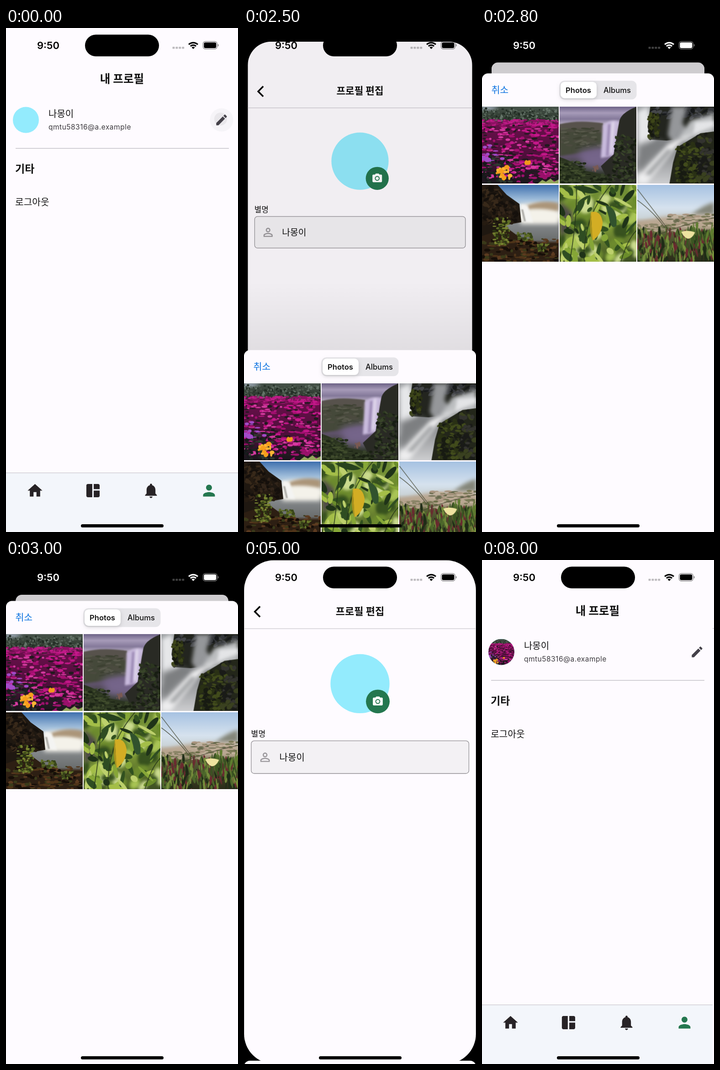
Animation, 508 px wide and 1102 px high, one loop 8.1 s. Source, as an HTML page with a canvas:

```html
<!DOCTYPE html>
<html lang="ko">
<head>
<meta charset="utf-8">
<title>프로필 편집</title>
<style>
html, body { margin: 0; width: 100%; height: 100%; overflow: hidden; background: #fefbff; }
canvas { display: block; width: 508px; height: 1102px; }
</style>
</head>
<body>
<canvas id="stage" width="508" height="1102"></canvas>
<script>
const W = 508, H = 1102, LOOP = 8100, CELL = 168;
const PAPER = '#fefbff', INK = '#111', GREEN = '#24774f', AQUA = '#93ebfd';
const NAME = '나몽이', MAIL = 'qmtu58316@a.example';
const ctx = document.getElementById('stage').getContext('2d');

// 24-unit icon outlines
const ICONS = {
  pencil: 'M3 17.25V21h3.75L17.81 9.94l-3.75-3.75zM20.71 7.04c.39-.39.39-1.02 0-1.41l-2.34-2.34c-.39-.39-1.02-.39-1.41 0l-1.83 1.83 3.75 3.75z',
  home: 'M10 20v-6h4v6h5v-8h3L12 3 2 12h3v8z',
  board: 'M11 21H5c-1.1 0-2-.9-2-2V5c0-1.1.9-2 2-2h6zM13 21h6c1.1 0 2-.9 2-2v-7h-8zM21 10V5c0-1.1-.9-2-2-2h-6v7z',
  bell: 'M12 22c1.1 0 2-.9 2-2h-4c0 1.1.9 2 2 2zM18 16v-5c0-3.07-1.64-5.64-4.5-6.32V4c0-.83-.67-1.5-1.5-1.5s-1.5.67-1.5 1.5v.68C7.63 5.36 6 7.92 6 11v5l-2 2v1h16v-1z',
  person: 'M12 12c2.21 0 4-1.79 4-4s-1.79-4-4-4-4 1.79-4 4 1.79 4 4 4zM12 14c-2.67 0-8 1.34-8 4v2h16v-2c0-2.66-5.33-4-8-4z',
  personLine: 'M12 5.9a2.1 2.1 0 1 1 0 4.2 2.1 2.1 0 0 1 0-4.2M12 14.9c2.97 0 6.1 1.46 6.1 2.1v1.1H5.9V17c0-.64 3.13-2.1 6.1-2.1M12 4C9.79 4 8 5.79 8 8s1.79 4 4 4 4-1.79 4-4-1.79-4-4-4zM12 13c-2.67 0-8 1.34-8 4v3h16v-3c0-2.66-5.33-4-8-4z',
  camera: 'M9 2 7.17 4H4c-1.1 0-2 .9-2 2v12c0 1.1.9 2 2 2h16c1.1 0 2-.9 2-2V6c0-1.1-.9-2-2-2h-3.17L15 2zM12 17a5 5 0 1 1 0-10 5 5 0 0 1 0 10zM12 15.2a3.2 3.2 0 1 0 0-6.4 3.2 3.2 0 0 0 0 6.4z'
};
for (const key in ICONS) ICONS[key] = new Path2D(ICONS[key]);

function icon(name, cx, cy, size, color) {
  ctx.save();
  ctx.translate(cx - size / 2, cy - size / 2);
  ctx.scale(size / 24, size / 24);
  ctx.fillStyle = color;
  ctx.fill(ICONS[name], 'evenodd');
  ctx.restore();
}

function rect(x, y, w, h, color, r = 0) {
  ctx.beginPath();
  ctx.roundRect(x, y, w, h, r);
  ctx.fillStyle = color;
  ctx.fill();
}

function disc(x, y, r, color) {
  ctx.beginPath();
  ctx.arc(x, y, r, 0, 7);
  ctx.fillStyle = color;
  ctx.fill();
}

function line(points, color, width) {
  ctx.beginPath();
  points.forEach(p => ctx.lineTo(...p));
  ctx.strokeStyle = color;
  ctx.lineWidth = width;
  ctx.stroke();
}

// cy is the optical middle of the line
function text(s, x, cy, size, { weight = 400, color = INK, align = 'left', gap = 0 } = {}) {
  ctx.font = `${weight} ${size}px Inter, "Noto Sans CJK KR", "Noto Sans CJK", sans-serif`;
  ctx.textAlign = align;
  ctx.letterSpacing = gap + 'px';
  ctx.fillStyle = color;
  ctx.fillText(s, x, cy + size * .365);
}

// Pictures: soft gradients, flat shapes and seeded specks
let seed = 7;
const rand = () => (seed = seed * 16807 % 2147483647) / 2147483647;

function picture(stops, paint) {
  const c = document.createElement('canvas');
  c.width = c.height = CELL;
  const g = c.getContext('2d'), fade = g.createLinearGradient(0, 0, 0, CELL);
  stops.forEach(([at, color]) => fade.addColorStop(at, color));
  g.fillStyle = fade;
  g.fillRect(0, 0, CELL, CELL);
  const poly = (color, d, blur = 0) => {
    g.filter = blur ? `blur(${blur}px)` : 'none';
    g.fillStyle = color;
    g.fill(new Path2D(d));
    g.filter = 'none';
  };
  const specks = (n, x, y, w, h, rx, ry, colors, tilt = 0) => {
    for (let i = 0; i < n; i++) {
      g.beginPath();
      g.ellipse(x + rand() * w, y + rand() * h, rx * (.5 + rand()), ry * (.5 + rand()), tilt * (rand() - .5), 0, 7);
      g.fillStyle = colors[i % colors.length];
      g.fill();
    }
  };
  paint(poly, specks, g);
  return c;
}

const photos = [
  picture([[0, '#47534a'], [.16, '#2c382d'], [.22, '#6a0f4b'], [.7, '#4a0f38'], [1, '#17171a']], (poly, specks) => {
    poly('#b4bfd0', 'M0 0H38Q20 8 0 8z', 3);
    specks(260, 0, 4, 168, 30, 2.2, 1.8, ['#66756a', '#222d24', '#4a584b']);
    specks(160, 0, 28, 168, 14, 4, 1.6, ['#c01c88', '#8e1263']);
    specks(330, 0, 40, 168, 116, 5, 2.2, ['#c4188a', '#1f1a1d', '#a40f70', '#d63aa0']);
    specks(90, 0, 108, 64, 60, 4, 2.5, ['#1c2420', '#2f3a30', '#15181a']);
    specks(50, 76, 140, 92, 28, 5, 2.5, ['#1f1b20', '#9b116c']);
    specks(22, 0, 84, 45, 34, 4, 2.2, ['#a34bc8']);
    specks(18, 32, 132, 32, 24, 4, 4, ['#f79f1c', '#ffb535']);
    specks(4, 97, 120, 8, 6, 4, 4, ['#f2991c']);
    poly('#94a75c', 'M122 168l10-8 8 4 10-7 8 7 10-5v9z');
  }),
  picture([[0, '#6f6488'], [.08, '#a79bb9'], [.16, '#84799a'], [.22, '#b1a7bd'], [.3, '#55504b'], [.65, '#5f526a'], [.8, '#3a4134'], [1, '#1d2417']], (poly, specks) => {
    poly('#57524c', 'M0 38Q40 28 95 36V90H0z', 1);
    poly('#45493a', 'M0 52Q50 44 95 58V92L0 108z', 2);
    specks(50, 0, 44, 90, 46, 8, 2, ['#3d4132', '#57584a', '#4b4b3f'], .6);
    poly('#75658a', 'M40 100Q85 82 122 92L112 136 54 134z', 8);
    poly('#c9bbdd', 'M94 40Q112 26 130 32L122 106 90 112z', 2);
    poly('#9886b1', 'M106 38l5 0-4 70-6 0z', 2);
    poly('#dfd6ea', 'M114 34l6-1-5 68-5 0z', 2);
    poly('#292a24', 'M168 0Q132 14 130 34L118 104 90 130 110 168H168z');
    poly('#2b3420', 'M0 110Q35 122 56 140L104 150 116 168H0z');
    specks(120, 0, 118, 56, 50, 4, 2, ['#414d2d', '#1d2616', '#323d24']);
    specks(110, 118, 62, 50, 90, 4, 2.5, ['#39452a', '#181e13', '#2c3620'], 2);
    specks(60, 60, 148, 108, 20, 4, 2, ['#1a2113', '#38432a']);
    specks(8, 72, 130, 12, 14, 1.5, 4, ['#7a5a52']);
  }),
  picture([[0, '#9fa2a5'], [.5, '#808285'], [1, '#cdced0']], (poly, specks) => {
    poly('#e6e7e9', 'M0 10L22 0 40 70 0 120z', 5);
    poly('#23251f', 'M28 0H168V38L130 66 64 74 30 72 22 44z');
    specks(60, 30, 0, 138, 24, 7, 4, ['#34363a', '#17191a', '#45474a'], 2);
    poly('#95979a', 'M76 0H108L98 36 116 58 84 88 66 62z', 4);
    poly('#bdbfc1', 'M116 30L168 14V56L104 76 92 66z', 4);
    poly('#e4e5e7', 'M126 34L168 30V42L122 60z', 3);
    specks(50, 26, 16, 20, 52, 4, 4, ['#3d4519', '#2a3014', '#15170f'], 2);
    poly('#eeeeef', 'M168 36Q110 60 84 88L20 168H0V150L66 82z', 5);
    poly('#a3a5a7', 'M66 92L16 148 28 150 78 96z', 4);
    poly('#7d7f81', 'M0 84L30 74 60 78 8 140H0z', 7);
    poly('#23261a', 'M168 54L138 58 88 88 78 122 70 168H168z');
    specks(150, 86, 82, 56, 82, 5, 3.5, ['#414b1c', '#2a3115', '#181b12'], 2);
    specks(70, 132, 60, 36, 104, 6, 4, ['#33332f', '#1a1b18', '#3a4120'], 2);
  }),
  picture([[0, '#3f70ae'], [.2, '#a3c0dc'], [.42, '#e4e2da'], [.5, '#85898c'], [.72, '#6b6e6e'], [.76, '#3b291a'], [1, '#20150d']], (poly, specks) => {
    poly('#f4f2ea', 'M82 44Q130 34 168 54V86H84z', 5);
    poly('#ab9579', 'M98 46Q130 32 168 40V58Q130 50 98 54z', 3);
    poly('#1f1811', 'M0 0H34L54 22 82 42 86 82 52 88 40 120 0 128z');
    poly('#2d1f13', 'M0 112L54 94 84 116 120 128 168 128V168H0z');
    poly('#f4f4f2', 'M84 42L100 46 112 82 90 80z', 2);
    poly('#a9a8a3', 'M86 54l4 0 6 26-4 0z', 1);
    specks(110, 0, 4, 44, 84, 5, 3, ['#15100c', '#38291a', '#261c12'], 2);
    specks(50, 36, 38, 42, 44, 5, 3, ['#15100c', '#32251a', '#261c12'], 2);
    specks(150, 0, 118, 168, 50, 5, 2.5, ['#4f3419', '#160e08', '#3a3a1a', '#5c3b20']);
    specks(90, 26, 72, 34, 60, 3, 2.2, ['#5e6d26', '#2c3612', '#788431']);
    specks(40, 78, 104, 32, 18, 3, 2, ['#5e6d26', '#39461a']);
    specks(24, 118, 130, 26, 18, 3, 2, ['#66742b', '#39461a']);
  }),
  picture([[0, '#6d8a35'], [.5, '#83a038'], [1, '#3e4f24']], (poly, specks, g) => {
    g.filter = 'blur(3px)';
    specks(60, 0, 0, 168, 168, 14, 12, ['#a9c455', '#6d8b2e', '#cbdb8e', '#38521f'], 3);
    poly('#4f4b48', 'M0 36L28 60 24 98 0 112z', 5);
    specks(60, 0, 0, 168, 168, 5, 13, ['#31501f', '#6b8c2b', '#a4be48', '#1f3318'], 3);
    specks(26, 0, 0, 168, 168, 5, 16, ['#2f4d22', '#86a637', '#bdd06c'], 2.4);
    g.lineWidth = 1.5;
    g.strokeStyle = '#24331a';
    g.stroke(new Path2D('M36 0Q40 60 22 168M112 0Q70 50 60 100T54 168M134 168Q148 120 168 100'));
    poly('#31522d', 'M100 44Q128 50 124 90 112 100 108 72z');
    poly('#27421e', 'M28 4Q60 -2 86 16 60 26 28 4z');
    poly('#d3ad24', 'M68 60Q90 54 94 82 92 110 72 122z');
    poly('#a8911d', 'M68 60L72 122Q62 98 68 60z');
  }),
  picture([[0, '#a6c2e2'], [.3, '#d6e2ee'], [.43, '#cbd4d8'], [.5, '#b3a18c'], [.62, '#5b6138'], [1, '#292a18']], (poly, specks, g) => {
    poly('#84867a', 'M168 38Q140 46 118 66H168z', 4);
    poly('#b9a792', 'M0 84Q60 62 168 66V98H0z', 4);
    specks(70, 70, 64, 98, 28, 6, 2, ['#7c7b59', '#a8947f', '#66694c', '#c2b19c']);
    specks(60, 0, 86, 90, 16, 5, 2, ['#8b8568', '#b5a28d', '#6a6e48']);
    specks(270, 0, 100, 168, 68, 2, 9, ['#4d682b', '#768d3c', '#6a2a30', '#1f2c17'], .7);
    specks(40, 108, 88, 60, 50, 2, 10, ['#5f7d30', '#3a5222'], .5);
    g.lineWidth = 1.2;
    g.strokeStyle = '#40432f';
    g.stroke(new Path2D('M0 10Q34 54 72 104M0 34Q36 60 60 94M0 132Q60 96 168 72'));
    poly('#eee3a0', 'M96 103Q110 98 126 104 120 118 110 118 100 114 96 103z');
  })
];

function avatar(x, y, r, chosen) {
  disc(x, y, r, AQUA);
  if (!chosen) return;
  ctx.save();
  ctx.clip();
  ctx.drawImage(photos[0], x - r, y - r, r * 2, r * 2);
  ctx.restore();
}

function profilePage(chosen, press) {
  rect(0, 0, W, H, PAPER);
  text('내 프로필', 254, 111, 24.6, { weight: 700, align: 'center' });
  avatar(43.5, 201, 28.5, chosen);
  text(NAME, 93, 188, 20);
  text(MAIL, 93, 216, 15.5, { color: '#3c393e', gap: .5 });
  if (press) {
    disc(472, 201, 25.5, '#f6f4f8');
    disc(470, 199, 13 + press * 11, '#e9e7eb');
  }
  icon('pencil', 472, 201, 31, '#444149');
  rect(21, 262.5, 467, 1.4, '#c6c3c9');
  text('기타', 20, 308, 23, { weight: 700 });
  text('로그아웃', 20, 381, 20.3);
  rect(0, 972, W, 130, '#f3f6fb');
  rect(0, 972, W, 1.3, '#cbc9cf');
  ['home', 'board', 'bell', 'person'].forEach((name, i) =>
    icon(name, 63.5 + 127 * i, 1011.5, 38.8, i < 3 ? '#272326' : GREEN));
}

function editPage(chosen) {
  rect(0, 0, W, H, PAPER);
  line([[35, 101], [23.6, 112.5], [35, 124]], '#000', 3.6);
  text('프로필 편집', 254, 111, 22, { weight: 700, align: 'center' });
  rect(0, 149, W, 1.3, '#cbc8ce');
  avatar(254, 270, 64.7, chosen);
  disc(293, 309, 26, GREEN);
  icon('camera', 293, 309, 26, '#fff');
  text('별명', 15, 379, 17.5);
  rect(15.6, 395, 477, 71.5, '#f3f1f4', 6.5);
  ctx.strokeStyle = '#939095';
  ctx.lineWidth = 1.3;
  ctx.stroke();
  icon('personLine', 46, 431, 31, '#9a979b');
  text(NAME, 77.5, 431, 20);
}

function sheet(top, picked) {
  ctx.save();
  ctx.translate(0, top);
  rect(0, 0, W, H, PAPER, 13);
  text('취소', 20.5, 36, 20.5, { color: '#0b72e0' });
  rect(169.5, 16, 169, 41, '#e6e5e9', 11);
  ctx.shadowColor = 'rgba(0,0,0,.16)';
  ctx.shadowBlur = 8;
  ctx.shadowOffsetY = 3;
  rect(172, 18.5, 79, 36, '#fff', 9);
  ctx.shadowColor = 'transparent';
  text('Photos', 211, 36.5, 16.6, { weight: 600, align: 'center' });
  text('Albums', 296, 36.5, 16.6, { weight: 500, align: 'center' });
  photos.forEach((p, i) => ctx.drawImage(p, i % 3 * 170.2, 73 + Math.floor(i / 3) * 170.5));
  if (picked) {
    rect(0, 73, CELL, CELL, 'rgba(255,255,255,.2)');
    disc(146, 219, 14, '#fff');
    disc(146, 219, 12.3, '#0b73ea');
    line([[140, 219.5], [144.5, 224.5], [152, 213.5]], '#fff', 1.8);
  }
  ctx.restore();
}

function statusBar(color) {
  text('9:50', 92.5, 38, 22, { weight: 600, color, align: 'center' });
  ctx.globalAlpha = .25;
  for (let i = 0; i < 4; i++) rect(364.5 + i * 6.9, 41, 5, 4.5, color, 1);
  ctx.globalAlpha = 1;
  ctx.strokeStyle = color;
  for (const [r, w] of [[13.9, 3.4], [8.6, 3.2], [2.5, 5]]) {
    ctx.beginPath();
    ctx.arc(410, 46, r, -Math.PI * .75, -Math.PI * .25);
    ctx.lineWidth = w;
    ctx.stroke();
  }
  ctx.globalAlpha = .45;
  ctx.beginPath();
  ctx.roundRect(431.3, 29.5, 31, 16.5, 5);
  ctx.lineWidth = 1.3;
  ctx.stroke();
  rect(463.7, 35, 2, 5.5, color, [0, 2, 2, 0]);
  ctx.globalAlpha = 1;
  rect(433.3, 31.5, 27, 12.5, color, 3.3);
}

const clamp = v => Math.min(1, Math.max(0, v));
const slide = u => 1 - (1 - clamp(u)) ** 4;
const spring = ms => {
  const x = Math.max(0, ms) * .0176;
  return 1 - (1 + x) * Math.exp(-x);
};

function pages(t) {
  const push = t < 100 ? 0 : t < 7700 ? slide((t - 40) / 420) : 1 - slide((t - 7640) / 500);
  const chosen = t >= 6300;
  if (push < .999) {
    ctx.save();
    ctx.translate(-push * W / 3, 0);
    profilePage(chosen, t < 500 ? .1 + t / 400 : 0);
    ctx.restore();
  }
  if (push > 0) {
    ctx.save();
    ctx.translate((1 - push) * W, 0);
    editPage(chosen);
    ctx.restore();
  }
}

function draw(t) {
  let up = t < 4650 ? spring(t - 2423) : 1 - spring(t - 4602);
  if (up < .0005) up = 0;
  const top = H - 1013 * up;
  rect(0, 0, W, H, '#000');
  ctx.save();
  if (up) {
    const scale = 1 - .0827 * up;
    ctx.translate(W * (1 - scale) / 2, 76 * up);
    ctx.scale(scale, scale);
    ctx.beginPath();
    ctx.roundRect(0, 0, W, H, 66 - 51 * up ** 1.5);
    ctx.clip();
  }
  pages(t);
  rect(0, 0, W, H, `rgba(0,0,0,${.19 * up ** 1.4})`);
  ctx.restore();
  rect(173, 14.5, 162, 47.5, '#000', 23.7);
  if (up) {
    if (t < 4000) {
      const shade = ctx.createLinearGradient(0, top - 150, 0, top + 14);
      shade.addColorStop(0, 'rgba(0,0,0,0)');
      shade.addColorStop(1, `rgba(0,0,0,${.12 * (1 - up)})`);
      rect(0, top - 150, W, 164, shade);
    }
    sheet(top, t >= 4700);
  }
  statusBar(up > .9 ? '#fff' : up > .42 ? '#dcdcdc' : '#000');
  rect(164, 1085, 181, 7, '#000', 3.5);
}

// The screen refreshes ten times a second
function tick() {
  draw(Math.floor(performance.now() % LOOP / 100) * 100);
  requestAnimationFrame(tick);
}
tick();
</script>
</body>
</html>
```
